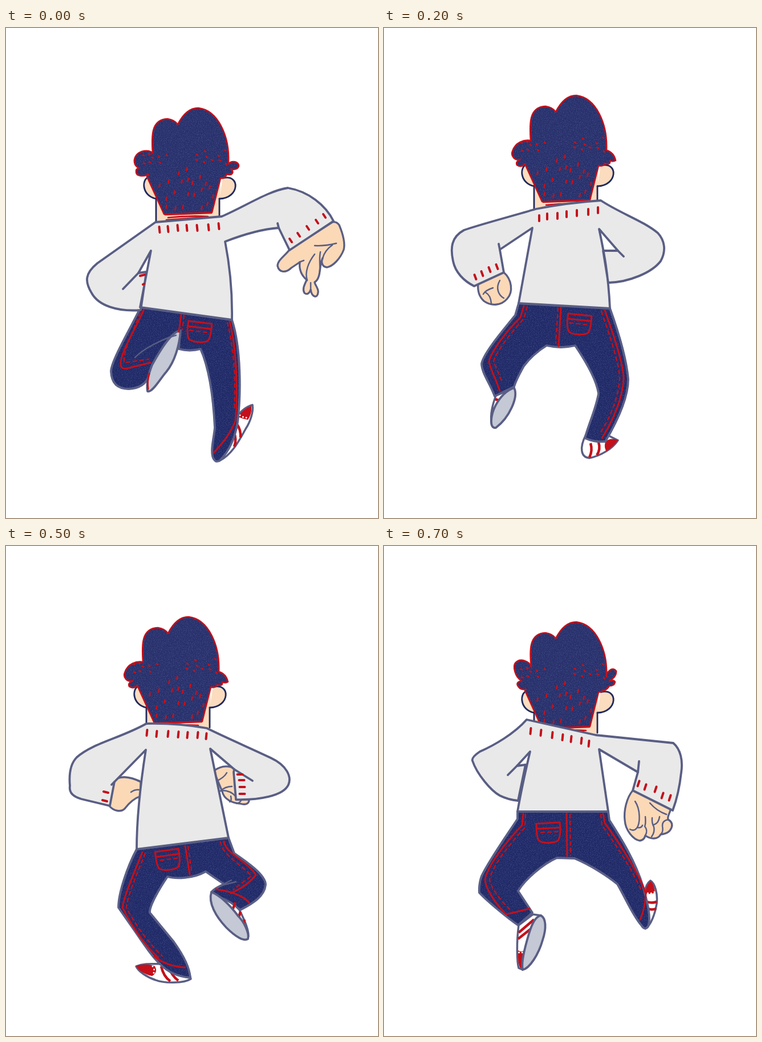
An HTML page that plays this animation: 652 px wide and 858 px high, repeating every 0.8 s.

```html
<!DOCTYPE html>
<html lang="en">
<head>
<meta charset="utf-8">
<title>Run cycle</title>
<style>
html, body { margin: 0; width: 100%; height: 100%; overflow: hidden; background: #fff; }
svg { display: block; width: 100vw; height: 100vh; }
path { stroke-linejoin: round; stroke-linecap: round; fill: none; }
.shirt, .jean, .skin, .white, .sole, .line { stroke: #595e84; stroke-width: 3.8; }
.shirt { fill: #e9e9e9; }
.jean { fill: #1f2966; filter: url(#grain); }
.skin { fill: #fbd9b7; stroke-width: 3.3; }
.white { fill: #fff; stroke-width: 3.5; }
.sole { fill: #c5c8d5; }
.fine { stroke: #595e84; stroke-width: 2.5; }
.seam { stroke: #c4101b; stroke-width: 3; }
.stitch { stroke: #c4101b; stroke-width: 2.3; stroke-dasharray: 6 6; }
.band { stroke: #c4101b; stroke-width: 4.5; stroke-linecap: butt; }
.tick { stroke: #c4101b; stroke-width: 4; }
.speck { stroke: #c4101b; stroke-width: 2.8; }
.red { fill: #c4101b; }
.dots { stroke: #fff; stroke-width: 3; stroke-dasharray: 0 6; }
.ear { fill: #fbdcbe; stroke: #1f2a5e; stroke-width: 2.8; }
.neck { fill: #fbdcbe; }
.edge { stroke: #1f2a5e; stroke-width: 2.8; }
.hair { fill: #27306a; filter: url(#grain); }
.rim { stroke: #c4101b; stroke-width: 2.6; }
</style>
</head>
<body>
<svg id="stage" viewBox="0 0 652 858" preserveAspectRatio="none">
  <defs>
    <filter id="grain" x="-5%" y="-5%" width="110%" height="110%" color-interpolation-filters="sRGB">
      <feTurbulence type="fractalNoise" baseFrequency=".7" numOctaves="2" seed="4"/>
      <feColorMatrix values="0 0 0 0 .44  0 0 0 0 .48  0 0 0 0 .72  1.1 0 0 0 -.5"/>
      <feComposite in2="SourceAlpha" operator="in" result="n"/>
      <feMerge><feMergeNode in="SourceGraphic"/><feMergeNode in="n"/></feMerge>
    </filter>
  </defs>
</svg>
<script>
const draw = parts => parts.map(([c, d, at]) =>
  `<path class="${c}" d="${d}"${at ? ` transform="${at}"` : ''}/>`).join('');

// Short equal strokes centred on "x,y" points
const marks = (pts, dx, dy) => pts.split(' ').map(p => {
  const [x, y] = p.split(',').map(Number);
  return `M${x - dx / 2} ${y - dy / 2}l${dx} ${dy}`;
}).join('');

const pocket = (x, y, turn) => {
  const at = `translate(${x} ${y}) rotate(${turn})`;
  return [
    ['seam', 'M0 0L41 0C42 15 41 25 38 30C30 36 10 36 4 31C0 24 -1 12 0 0ZM0 9H41', at],
    ['stitch', 'M4 16H38', at]
  ];
};

const curls = {
  mid: ['L250 256C244 260 228 261 228 252Q227 247 233 245C219 240 223 215 246 215Q253 215 257 219',
    'L390 238C396 231 408 234 408 242C406 249 399 248 394 247C401 253 396 259 387 256Q384 264 376 263'],
  low: ['L247 260Q240 267 233 262Q230 256 239 252C229 255 222 246 225 238C230 222 246 217 257 219',
    'L390 236Q403 240 406 254Q401 257 396 254Q398 262 387 259Q384 265 376 263'],
  high: ['L249 258Q240 259 237 255C231 249 233 245 241 243C229 236 226 218 230 212C238 202 255 208 258 219',
    'L390 231Q400 217 407 226Q408 236 395 243Q403 241 405 245Q404 252 395 252Q390 261 376 263']
};

const head = curl => {
  const [left, right] = curls[curl];
  const hair = `M277 326L247 260${left}C255 190 254 160 283 159Q296 161 301 169C311 149 323 140 337 140C372 144 392 190 390 236${right}L361 323Z`;
  return draw([
    ['neck', 'M263 262H376L374 336L263 341Z'],
    ['ear', 'M250 261C237 265 238 294 263 299'],
    ['ear', 'M374 299C410 298 411 255 380 263'],
    ['edge', 'M263 298V340M374 299V334'],
    ['hair', hair], ['rim', hair],
    ['rim', 'M279 327L360 324M284 332Q320 328 354 330M281 336L350 331'],
    ['speck', marks('303,254 317,247 340,261 350,273 327,271 308,269 285,269 269,276 319,291 330,292 343,283 357,279 363,295 281,299 295,288 319,266 310,313 297,316 281,313 353,308 343,315', -1, 5)],
    ['speck', marks('241,223 251,221 257,227 268,226 282,223 242,237 252,235 270,236 349,216 352,226 361,231 373,224 384,214 375,232 335,222 334,231 347,235 386,238', 2, 1)]
  ]);
};

const poses = {
  stride: {
    legs: [
      ['white', 'M404 684C410 670 424 662 432 660C434 672 428 690 420 702C406 728 394 748 374 758Z'],
      ['red', 'M407 681C413 670 423 664 430 662C431 672 428 680 424 686Q414 684 407 681Z'],
      ['dots', 'M410 678Q417 683 424 682'],
      ['band', 'M405 694Q412 704 411 717M399 707Q405 720 400 733'],
      ['jean', 'M236 489C215 532 185 582 184 601C185 625 199 632 215 632C232 631 245 624 250 610L305 530L303 562Q322 567 341 562C358 600 364 660 366 700C364 720 359 735 362 750Q366 763 375 757C392 740 402 715 406 690C412 640 412 560 396 511Z'],
      ['sole', 'M306 530C290 530 267 570 256 590C249 608 246 624 248 636C256 640 271 613 281 602C296 584 304 555 306 530Z'],
      ['seam', 'M251 605Q247 617 249 632M242 492C226 530 199 570 201 590Q202 598 212 596L253 586M307 502L303 532M392 514C404 560 407 640 402 688C393 712 378 728 364 744'],
      ['stitch', 'M235 499C222 535 206 560 207 586L250 580M312 503L309 528M388 516C399 560 403 610 400 670'],
      ['fine', 'M226 577C241 561 276 544 298 538'],
      ...pocket(320, 513, 7)
    ],
    arms: [
      ['skin', 'M497 388C490 398 475 407 476 417C479 429 491 429 500 420L515 410C513 425 520 435 527 441C523 450 519 457 523 464Q530 469 534 458C536 472 546 474 547 463C548 455 541 450 541 445C550 440 550 425 552 410L555 403C551 412 556 419 563 419C573 417 586 404 592 388C595 375 589 357 584 345Q579 338 572 340Z'],
      ['fine', 'M514 410L522 407M541 396C530 410 523 428 528 442M551 392C548 406 552 420 549 432M541 381Q560 382 579 377M572 380Q559 389 555 403M534 446V458'],
      ['shirt', 'M262 340L160 412C138 430 138 444 150 464C162 486 195 497 236 494L246 427L232 429L254 390L235 489L396 511C397 460 391 410 384 374C415 362 450 352 478 350L497 389L574 338C560 310 530 286 494 280C460 285 420 312 378 330Z'],
      ['line', 'M232 429L205 457M478 350L476 342'],
      ['tick', marks('269,353 284,352 301,350 317,350 335,350 355,349 373,347', 1, 10)],
      ['tick', marks('499,372 513,362 529,350 545,339 558,329', 4, 6)],
      ['tick', 'M235 434L243 432M240 449L242 448']
    ]
  },
  plant: {
    legs: [
      ['white', 'M302 736L298 750C310 758 345 758 360 752C375 747 390 737 394 728C380 722 365 724 345 724Z'],
      ['red', 'M394 727C380 723 366 725 361 728Q355 738 366 745C380 742 390 735 394 727Z'],
      ['dots', 'M365 728Q359 736 366 744'],
      ['band', 'M335 732Q332 744 320 753M350 728Q346 746 334 754'],
      ['jean', 'M232 503L222 530C200 545 167 568 167 585C169 606 190 618 211 629L262 598C255 590 247 588 240 584L272 562C295 575 325 575 339 571C352 590 371 622 370 634L328 685C310 710 300 732 299 748Q332 745 352 724C365 712 380 690 395 668L425 625C425 600 410 555 393 523Z'],
      ['white', 'M198 679C194 668 205 645 213 629Q225 615 250 606Z'],
      ['band', 'M220 616L226 632M211 632L215 645M204 646L207 660'],
      ['sole', 'M262 598C268 617 254 641 236 660C220 676 205 685 198 680C195 670 205 650 215 640C230 620 248 603 262 598Z'],
      ['seam', 'M240 509C238 530 198 545 184 568C195 582 210 592 228 600M196 616Q212 599 254 593M308 517L300 567M383 528C400 570 415 605 418 625C400 660 380 690 355 713M308 730Q340 728 362 711'],
      ['stitch', 'M246 510C243 534 206 552 192 570L224 594M303 518L297 560M378 530C394 570 409 605 411 625C394 657 372 688 348 710'],
      ['fine', 'M219 580L247 587L227 577'],
      ...pocket(320, 522, 8)
    ],
    arms: [
      ['skin', 'M220 382Q240 372 258 386L243 422C240 436 225 442 212 443Q198 447 196 438L200 428Z'],
      ['fine', 'M235 389Q240 398 254 404M226 413Q238 413 246 421M243 420Q228 420 219 431M228 430Q226 438 230 440M209 436Q212 442 218 443'],
      ['skin', 'M386 405C405 395 425 393 436 405L441 447C433 457 420 458 414 452C405 440 395 433 386 430Z'],
      ['fine', 'M388 419Q396 418 403 423M388 403L398 400'],
      ['shirt', 'M270 311C240 326 185 350 158 363C130 376 121 396 127 410C136 430 180 437 219 436L223 388L222 383L264 347L232 503L393 523C393 460 385 400 377 349L432 405L440 447L490 435C503 431 512 425 510 412C512 390 508 372 498 362C470 337 420 328 376 303Q320 302 270 311Z'],
      ['line', 'M222 383L190 403M432 405L437 410'],
      ['tick', marks('271,325 286,323 304,323 320,322 338,321 358,321 375,319', 1, 10)],
      ['tick', marks('212,392 209,402 208,414 208,426', 9, 0)],
      ['tick', marks('447,423 449,438', 8, -2)]
    ]
  },
  push: {
    legs: [
      ['white', 'M354 712C342 735 345 752 360 753C380 749 400 737 410 722L390 712Z'],
      ['red', 'M410 722Q398 716 388 724Q385 736 390 741Q402 733 410 722Z'],
      ['band', 'M362 727Q366 740 360 752M376 725Q380 738 373 748'],
      ['jean', 'M236 482L230 503C208 530 174 570 171 588C172 606 186 622 194 645L228 628C232 615 238 605 245 592C258 575 272 564 285 556Q310 562 335 556C358 590 373 620 376 640C372 665 360 690 352 718Q370 726 388 724C405 695 428 650 428 615C425 580 410 530 396 491Z'],
      ['white', 'M190 697C184 680 190 660 196 644L224 632Z'],
      ['band', 'M195 650L214 656M191 666L204 671'],
      ['sole', 'M228 630C236 646 220 682 196 700C184 702 187 678 195 662Q208 637 228 630Z'],
      ['seam', 'M245 487L239 507C215 530 188 566 184 584C187 600 198 618 203 636M310 489L306 557M387 494C405 545 420 590 420 615C418 650 400 690 382 718'],
      ['stitch', 'M251 488L245 509C222 534 197 566 192 584L208 622M305 490L301 552M381 496C398 545 413 590 413 615C411 645 396 685 378 710'],
      ...pocket(323, 500, 6)
    ],
    arms: [
      ['skin', 'M165 448L210 428C224 440 227 462 216 474C205 487 187 487 175 478Q163 467 165 448Z'],
      ['fine', 'M203 442C195 456 201 468 210 473M178 463Q187 468 188 482M191 455Q178 459 174 466'],
      ['shirt', 'M266 317C222 330 165 345 140 354C118 366 116 385 121 408C125 428 140 443 158 452L210 428L203 388L260 350L236 482L396 491C393 430 386 395 377 352L410 390L384 390L393 446C430 445 470 428 485 408C495 390 492 372 480 359C455 338 415 325 380 302Q320 306 266 317Z'],
      ['line', 'M410 390L420 400M203 388L201 378'],
      ['tick', marks('272,333 286,330 304,329 320,326 338,324 358,322 375,319', 0, 10)],
      ['tick', marks('160,436 172,430 185,423 198,418', 3, 8)]
    ]
  },
  leap: {
    legs: [
      ['white', 'M166 582C158 587 153 605 155 622C158 640 165 660 175 666L184 640L176 602Q174 588 166 582Z'],
      ['red', 'M158 603C159 592 163 584 166 583Q174 590 175 604Q167 607 158 603Z'],
      ['dots', 'M159 602Q167 606 175 603'],
      ['band', 'M155 619Q164 622 172 619M156 631Q164 634 170 631'],
      ['jean', 'M240 461L238 476C218 507 193 547 179 592C170 625 165 648 170 662Q176 670 182 660C197 643 210 612 224 588C240 575 270 555 299 543L330 542C355 553 386 580 398 600L373 638L398 660C420 645 455 615 466 603Q467 588 462 574C448 545 416 500 399 474V461Z'],
      ['white', 'M358 643L372 641L397 660C401 690 400 725 397 735L390 738Z'],
      ['band', 'M370 650L397 673M374 665L398 684'],
      ['red', 'M384 702Q392 709 398 704Q399 724 395 734L390 737Z'],
      ['dots', 'M386 704Q392 711 398 707'],
      ['sole', 'M358 643C349 648 348 665 355 686C362 711 378 736 390 738C393 725 386 698 379 675C373 655 367 645 358 643Z'],
      ['seam', 'M249 465L246 481C225 510 190 560 174 605Q176 632 184 650M313 464L312 539M389 465L391 485C420 515 451 555 456 580C455 596 438 622 419 641L378 631'],
      ['stitch', 'M253 466L251 485C232 512 200 557 182 600M307 466L306 538M385 466L386 489C414 519 443 556 448 580C446 594 430 615 413 632'],
      ...pocket(325, 480, 3)
    ],
    arms: [
      ['skin', 'M131 457L197 424C208 437 213 460 211 476C210 494 196 510 185 512Q177 511 175 503C165 510 153 510 148 501Q133 500 129 489Q126 480 135 475C137 469 131 463 131 457Z'],
      ['fine', 'M167 446Q155 460 138 466M193 443C183 458 184 482 190 490Q195 496 202 492M135 475Q146 477 145 487Q143 496 148 501M150 470Q152 482 160 484M163 472Q164 481 160 488Q158 497 164 505M175 470Q174 482 176 487Q170 494 175 503M180 485Q182 490 188 489'],
      ['shirt', 'M262 327L126 341C113 352 109 372 112 392C115 420 121 443 127 459L197 424L188 392L256 352L240 461H399C392 420 385 390 377 356L400 381L385 379L398 442C408 441 420 438 430 433C445 425 470 396 478 372Q480 366 465 356C440 345 405 325 383 300Z'],
      ['line', 'M400 381L416 397M188 392L186 373'],
      ['tick', marks('274,342 287,337 305,334 320,331 338,327 358,323 376,320', 1, 10)],
      ['tick', marks('132,437 145,433 157,422 175,418 187,412', 3, 9)]
    ]
  }
};

// pose, curl, head dx, head dy, mirror axis sum (0 = unmirrored), body dy
const steps = [
  ['stride', 'mid', 0, 0, 0, 0],
  ['plant', 'low', 0, -25, 0, 0],
  ['push', 'low', 0, -22, 0, 0],
  ['leap', 'low', 0, -14, 0, 0],
  ['stride', 'high', -3, 16, 632, 15],
  ['plant', 'low', -17, -16, 622, 8],
  ['push', 'low', -8, -14, 628, 6],
  ['leap', 'high', 0, -7, 633, 4]
];

const stage = document.getElementById('stage');
const beat = 100, loop = beat * steps.length;

steps.forEach(([name, curl, hx, hy, sum, dy], i) => {
  const g = document.createElementNS('http://www.w3.org/2000/svg', 'g');
  const flip = sum ? `matrix(-1 0 0 1 ${sum} ${dy})` : '';
  const { legs, arms } = poses[name];
  g.innerHTML = `<g transform="${flip}">${draw(legs)}</g>` +
    `<g transform="translate(${hx} ${hy})">${head(curl)}</g>` +
    `<g transform="${flip}">${draw(arms)}</g>`;
  stage.append(g);
  const show = g.animate([
    { opacity: 1, easing: 'step-end' },
    { opacity: 0, offset: 1 / steps.length, easing: 'step-end' },
    { opacity: 0 }
  ], { duration: loop, iterations: Infinity, delay: i * beat - loop });
  show.startTime = 0;
});
</script>
</body>
</html>
```
